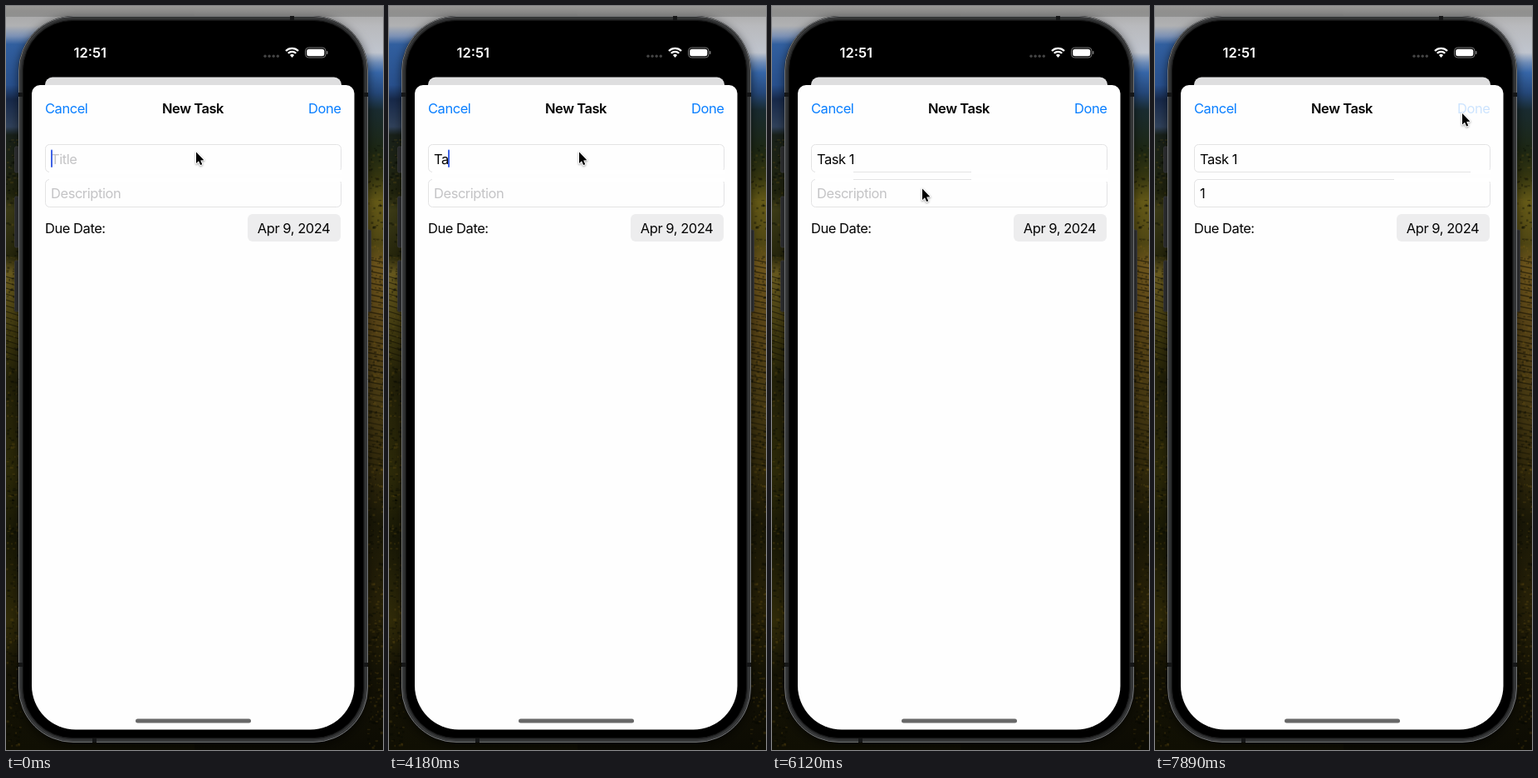
Recreate the animation shown at these times as an HTML page with a canvas. Size 454x894 px, loop 8 s.

```html
<!DOCTYPE html>
<html lang="en">
<head>
<meta charset="utf-8">
<title>New Task</title>
<style>
  html, body { margin: 0; width: 100%; height: 100%; overflow: hidden; background: #111; }
  canvas { display: block; width: 454px; height: 894px; }
</style>
</head>
<body>
<canvas id="stage"></canvas>
<script>
const W = 454, H = 894, LOOP = 8000;
const scale = window.devicePixelRatio || 1;
const BLUE = '#0a7fff', INK = '#050505', HINT = '#c4c4c6';
const CARET = '#3f63e6', LINE = '#e3e3e4';

function setup(canvas) {
  canvas.width = W * scale;
  canvas.height = H * scale;
  const c = canvas.getContext('2d');
  c.scale(scale, scale);
  return c;
}

const ctx = setup(document.getElementById('stage'));
const backdrop = document.createElement('canvas');

function box(c, x, y, w, h, r, fill, stroke, width = 1) {
  c.beginPath();
  c.roundRect(x, y, w, h, r);
  if (fill) { c.fillStyle = fill; c.fill(); }
  if (stroke) { c.strokeStyle = stroke; c.lineWidth = width; c.stroke(); }
}

function text(c, str, x, y, color, weight = 400, spacing = -0.45, size = 16.5) {
  c.font = `${weight} ${size}px Inter, "Noto Sans", sans-serif`;
  c.letterSpacing = spacing + 'px';
  c.fillStyle = color;
  c.fillText(str, x, y);
}

function seeded(seed) {
  return () => (seed = (seed * 16807) % 2147483647) / 2147483647;
}

function fade(c, x, w, stops) {
  const g = c.createLinearGradient(0, 0, 0, H);
  for (const [y, color] of stops) g.addColorStop(y / H, color);
  c.fillStyle = g;
  c.fillRect(x, 0, w, H);
}

function drawLandscape(c) {
  fade(c, 0, W / 2, [
    [0, '#a5a4a2'], [24, '#b0b1b3'], [36, '#7d92b5'], [46, '#315f9f'], [95, '#28508d'],
    [112, '#17294a'], [145, '#30415a'], [155, '#182019'], [225, '#20230d'],
    [245, '#3b3a16'], [300, '#25250b'], [320, '#66581e'], [350, '#564b17'],
    [405, '#37320c'], [450, '#211f07'], [560, '#2c2908'], [640, '#171705'],
    [740, '#302a08'], [800, '#141204'], [894, '#100f03']
  ]);
  fade(c, W / 2, W / 2, [
    [0, '#a5a4a2'], [24, '#b9babd'], [56, '#c0c5ce'], [68, '#6f8db8'], [80, '#3666a8'],
    [104, '#25487a'], [125, '#192b30'], [175, '#1d2712'], [205, '#35360f'],
    [235, '#655a17'], [285, '#4f4613'], [310, '#6c541b'], [380, '#574316'],
    [480, '#443711'], [560, '#2f270a'], [620, '#191706'], [720, '#262007'],
    [800, '#141204'], [894, '#0c0b03']
  ]);

  // vineyard rows
  c.lineWidth = 1.3;
  for (let y = 304; y < 550; y += 7) {
    c.strokeStyle = `rgba(15,14,3,${y < 460 ? 0.55 : 0.4})`;
    c.beginPath();
    c.moveTo(434, y); c.lineTo(454, y + 4);
    if (y > 320 && y < 425) { c.moveTo(0, y); c.lineTo(16, y + 5); }
    c.stroke();
  }

  // foliage
  const rnd = seeded(71);
  for (let i = 0; i < 900; i++) {
    const x = rnd() < 0.5 ? rnd() * 17 : 435 + rnd() * 19;
    const y = 160 + rnd() * 730;
    c.fillStyle = rnd() < 0.55 ? 'rgba(5,7,2,.35)' : 'rgba(134,108,26,.2)';
    c.fillRect(x, y, 1 + rnd() * 3, 1 + rnd() * 2);
  }

  // menu bar strip
  const g = c.createLinearGradient(0, 0, 0, 13);
  g.addColorStop(0, '#999896');
  g.addColorStop(1, 'rgba(120,120,119,.5)');
  c.fillStyle = g;
  c.fillRect(0, 0, W, 13);
}

function drawPhone(c) {
  c.save();
  c.shadowColor = 'rgba(0,0,0,.6)';
  c.shadowBlur = 12 * scale;
  c.shadowOffsetY = 3 * scale;
  box(c, 15, 12, 421, 873, 66, '#222');
  c.restore();

  const buttons = [[10.5, 169, 31], [10.5, 229, 61], [10.5, 306, 61], [434, 269, 98]];
  for (const [x, y, h] of buttons) box(c, x, y, 5.5, h, 1.5, '#27282a', '#3b3c3e', 0.7);

  box(c, 15.5, 12.5, 420, 872, 65.5, '#292a2b', '#747678');
  box(c, 17.5, 14.5, 416, 868, 63.5, null, '#3b3c3d', 1.5);
  const bands = [[342, 12, 5, 6], [104, 879, 5, 6], [15, 104, 6, 5],
                 [430, 104, 6, 5], [15, 789, 6, 5], [430, 789, 6, 5]];
  c.fillStyle = '#151617';
  for (const b of bands) c.fillRect(...b);
  box(c, 20.5, 17.5, 410, 862, 60, '#000', '#111', 1);
}

function drawStatus(c) {
  text(c, '12:51', 81.5, 62, '#fff', 600, 0);
  c.fillStyle = '#444';
  for (let i = 0; i < 4; i++) {
    c.beginPath();
    c.arc(312 + i * 5.1, 60.2, 1.7, 0, 7);
    c.fill();
  }

  // wifi
  c.strokeStyle = c.fillStyle = '#fff';
  c.lineWidth = 2.3;
  for (const r of [6.7, 10.6]) {
    c.beginPath();
    c.arc(344.5, 61.5, r, -Math.PI * 0.75, -Math.PI * 0.25);
    c.stroke();
  }
  c.beginPath();
  c.moveTo(344.5, 62);
  c.arc(344.5, 61.5, 3.6, -Math.PI * 0.75, -Math.PI * 0.25);
  c.fill();

  // battery
  box(c, 360.5, 50, 24.5, 12, 4, null, '#777', 1);
  box(c, 362.2, 51.7, 21.1, 8.6, 2.5, '#fff');
  box(c, 386, 54, 1.5, 4, 0.8, '#777');
}

function drawField(c, y, bottom) {
  c.strokeStyle = LINE;
  c.lineWidth = 1;
  c.beginPath();
  c.roundRect(47.5, y + 0.5, 356, 33, 5);
  c.stroke();
  // the inner edges start out blank
  c.fillStyle = '#fff';
  c.fillRect(52, bottom ? y - 1 : y + 31, 353, bottom ? 4 : 5);
}

function drawSheet(c) {
  box(c, 47, 85.5, 357, 30, 9, '#dededf');
  box(c, 31, 95, 388.5, 774.5, [10, 10, 53, 53], '#fefefe');
  text(c, 'Cancel', 47, 129, BLUE);
  text(c, 'New Task', 188, 129, INK, 600);
  drawField(c, 166, false);
  drawField(c, 208, true);
  text(c, 'Due Date:', 47, 272.8, INK);
  box(c, 291, 250, 112, 33, 6, '#ededee');
  text(c, 'Apr 9, 2024', 302.8, 272.8, INK);
  box(c, 156, 856.5, 139, 5, 2.5, '#686868');
}

function drawCursor(x, y) {
  ctx.save();
  ctx.translate(x, y);
  ctx.beginPath();
  ctx.moveTo(0, 0);
  ctx.lineTo(0, 13.6);
  ctx.lineTo(3, 10.8);
  ctx.lineTo(5.1, 15.6);
  ctx.lineTo(7.3, 14.7);
  ctx.lineTo(5.2, 9.9);
  ctx.lineTo(9.4, 9.7);
  ctx.closePath();
  ctx.shadowColor = 'rgba(0,0,0,.4)';
  ctx.shadowBlur = 2.5 * scale;
  ctx.shadowOffsetY = scale;
  ctx.lineJoin = 'round';
  ctx.lineWidth = 1.8;
  ctx.strokeStyle = '#fff';
  ctx.stroke();
  ctx.shadowColor = 'transparent';
  ctx.fillStyle = '#000';
  ctx.fill();
  ctx.restore();
}

// Each entry takes effect at its time and changes only the listed values.
const steps = [
  [0, { title: '', note: '', caret: 54, row: 0, glow: 1, x: 229, y: 175.5, from: 0, to: 0, done: 1 }],
  [300, { glow: 0 }],
  [600, { glow: 0.5 }],
  [740, { glow: 1 }],
  [1040, { title: 't', caret: 58 }],
  [1940, { title: '', caret: 54 }],
  [2980, { glow: 0 }],
  [3280, { title: 'T', caret: 62.5, glow: 1 }],
  [4180, { title: 'Ta', caret: 71 }],
  [4330, { title: 'Tas', caret: 79 }],
  [4630, { title: 'Task', caret: 87 }],
  [4920, { title: 'Task ', caret: 91 }],
  [5070, { title: 'Task 1', caret: 99 }],
  [5820, { x: 213, y: 190, from: 211, to: 240 }],
  [5970, { x: 188, y: 212, from: 186 }],
  [6120, { x: 181, y: 219.5, glow: 0, from: 98 }],
  [6410, { row: 1, caret: 54, glow: 1, from: 54 }],
  [6560, { note: '1', caret: 60, from: 52 }],
  [6860, { x: 214, y: 208 }],
  [7010, { x: 277.5, y: 180.5, to: 288 }],
  [7150, { x: 330, y: 160, to: 340 }],
  [7300, { x: 357, y: 142, to: 367, glow: 0.5 }],
  [7450, { x: 367, y: 132, to: 377, glow: 0 }],
  [7600, { x: 369, y: 129.5, to: 380 }],
  [7740, { x: 370, y: 129 }],
  [7890, { done: 0.2 }]
];

function stateAt(t) {
  const s = {};
  for (const [time, change] of steps) if (time <= t) Object.assign(s, change);
  return s;
}

function draw(t) {
  const s = stateAt(t);
  ctx.drawImage(backdrop, 0, 0, W, H);

  ctx.fillStyle = LINE;
  ctx.fillRect(s.from, 199, s.to - s.from, 1);
  ctx.fillRect(s.from, 208, Math.min(s.to, 288) - s.from, 1);

  ctx.globalAlpha = s.done;
  text(ctx, 'Done', 364, 129, BLUE);
  ctx.globalAlpha = 1;
  text(ctx, s.title || 'Title', 54, 189.7, s.title ? INK : HINT);
  text(ctx, s.note || 'Description', 54, 231.2, s.note ? INK : HINT);

  ctx.globalAlpha = s.glow;
  box(ctx, s.caret, s.row ? 214 : 172.5, 2, 21.5, 1, CARET);
  ctx.globalAlpha = 1;
  drawCursor(s.x, s.y);
}

const still = setup(backdrop);
for (const paint of [drawLandscape, drawPhone, drawStatus, drawSheet]) paint(still);

const start = performance.now();
function tick() {
  draw((performance.now() - start) % LOOP);
  requestAnimationFrame(tick);
}
tick();
</script>
</body>
</html>
```
